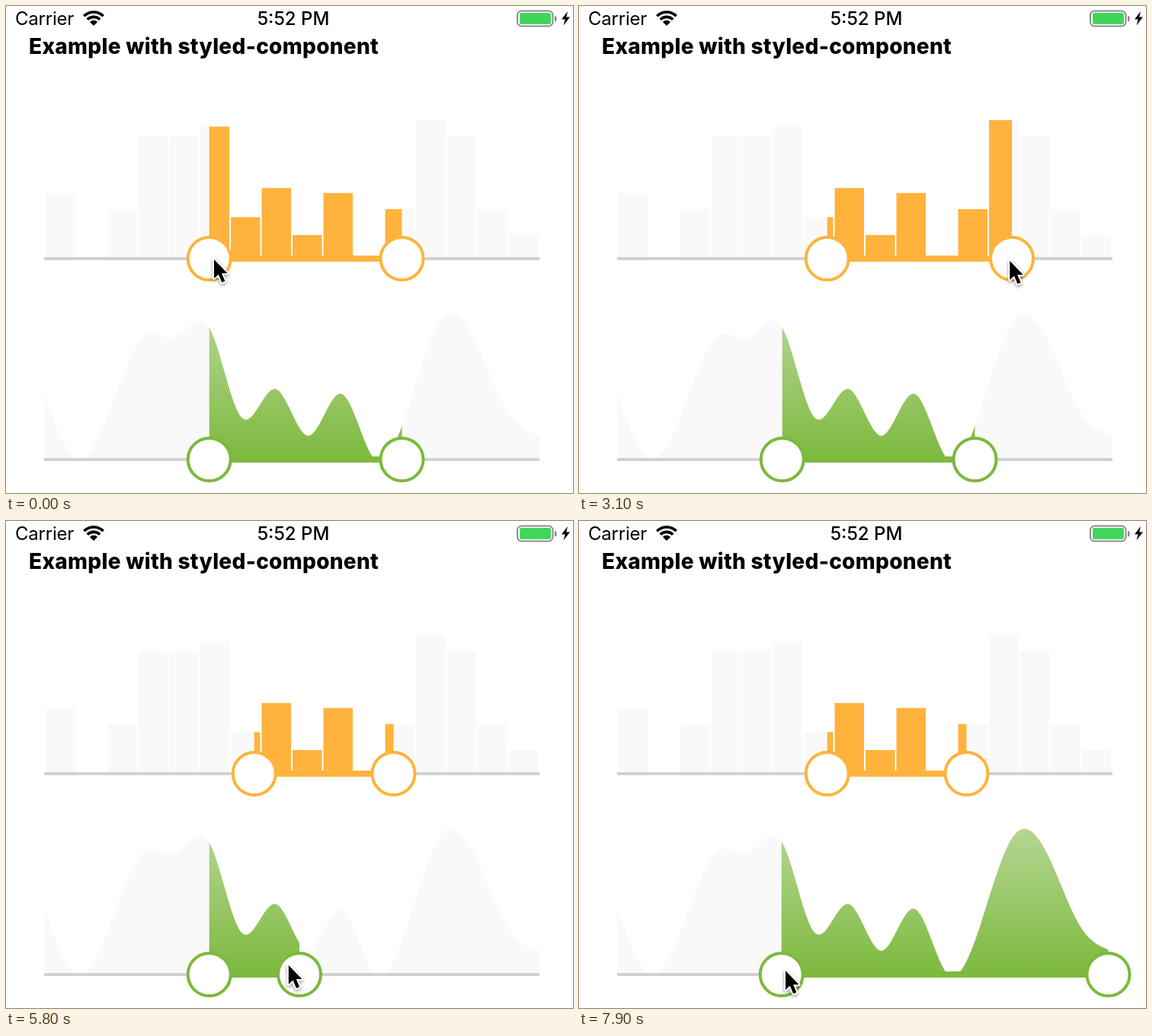
These frames come from a looping animation (744x640 px, 8 s). An HTML page with a canvas:

```html
<!DOCTYPE html>
<html lang="en">
<head>
<meta charset="utf-8">
<title>Range sliders</title>
<style>
  html, body { margin: 0; width: 100%; height: 100%; overflow: hidden; background: #fff; }
  canvas { display: block; }
</style>
</head>
<body>
<canvas id="stage" width="744" height="640"></canvas>
<script>
const ctx = document.getElementById('stage').getContext('2d');
const LOOP = 8000, STEP = 100;
const LEFT = 50, WIDTH = 650;
const BAR_BASE = 330, AREA_BASE = 594;
const SHAPE_DROP = 0.7;
const ORANGE = '#ffb33c', GREEN = '#7cb93d', PALE = '#f9f9f9', TRACK = '#d1d1d1';
const FONT = 'Inter, "Open Sans", sans-serif';

const values = [50, 10, 40, 85, 85, 91, 35, 53, 24, 50, 10, 40, 95, 85, 40, 24];
const heights = values.map(v => (v - 10) * 2.125);

const rest = { barStart: 266.7, barEnd: 519.5, areaStart: 266.7, areaEnd: 519.5, x: 272, y: 332 };

// A drag takes a thumb to a place, the pointer holding it at an offset (grip).
const drag = (start, end, thumb, to, grip, y) =>
  ({ start, end, goal: { [thumb]: to, x: to + grip, y } });
const glide = (start, end, x, y) => ({ start, end, goal: { x, y } });

const moves = [
  drag(0, 950, 'barStart', 98, -12, 336),
  drag(950, 1850, 'barStart', 325.7, 26, 334),
  glide(1950, 2400, 514, 334),
  drag(2500, 3000, 'barEnd', 594, -3, 334),
  drag(3000, 3400, 'barEnd', 428, -8, 334),
  drag(3400, 3800, 'barEnd', 508.5, -4, 345),
  glide(3900, 4250, 500, 572),
  glide(4250, 4600, 513, 596),
  drag(5000, 5400, 'areaEnd', 622, -4, 588),
  drag(5400, 5920, 'areaEnd', 348, -17, 582),
  drag(5920, 6800, 'areaEnd', 694.5, -2.5, 590),
  glide(7000, 7300, 275, 588),
  glide(7400, 7700, 270, 590),
  drag(7800, 7900, 'areaStart', 265.7, 4.3, 590),
];

function poseAt(t) {
  const pose = { ...rest };
  for (const { start, end, goal } of moves) {
    if (t <= start) break;
    const u = Math.min(1, (t - start) / (end - start));
    const eased = u * u * (3 - 2 * u);
    for (const key in goal) pose[key] += (goal[key] - pose[key]) * eased;
  }
  return pose;
}

// Slopes of a natural cubic spline, found by relaxation.
function splineSlopes(y) {
  const n = y.length - 1, m = y.map(() => 0);
  for (let pass = 0; pass < 40; pass++) {
    for (let i = 0; i <= n; i++) {
      if (i === 0) m[i] = (3 * (y[1] - y[0]) - m[1]) / 2;
      else if (i === n) m[i] = (3 * (y[n] - y[n - 1]) - m[n - 1]) / 2;
      else m[i] = (3 * (y[i + 1] - y[i - 1]) - m[i - 1] - m[i + 1]) / 4;
    }
  }
  return m;
}

function makeArea() {
  const base = AREA_BASE + SHAPE_DROP;
  const y = heights.map(h => base - h), m = splineSlopes(y);
  const dx = WIDTH / (y.length - 1);
  const path = new Path2D();
  path.moveTo(LEFT, base);
  path.lineTo(LEFT, y[0]);
  for (let i = 0; i < y.length - 1; i++) {
    const x = LEFT + i * dx;
    path.bezierCurveTo(x + dx / 3, y[i] + m[i] / 3,
      x + dx * 2 / 3, y[i + 1] - m[i + 1] / 3, x + dx, y[i + 1]);
  }
  path.lineTo(LEFT + WIDTH, base);
  path.closePath();
  return path;
}

function makeBars() {
  const pad = 0.05, step = WIDTH / (heights.length + pad);
  const path = new Path2D();
  heights.forEach((h, i) => {
    path.rect(LEFT + step * (i + pad), BAR_BASE + SHAPE_DROP - h, step * (1 - pad), h);
  });
  return path;
}

const area = makeArea(), bars = makeBars();
const shade = ctx.createLinearGradient(0, 404, 0, 598);
shade.addColorStop(0, '#b5d693');
shade.addColorStop(1, GREEN);

function rect(x, y, w, h, color, r = 0) {
  ctx.fillStyle = color;
  ctx.beginPath();
  ctx.roundRect(x, y, w, h, r);
  ctx.fill();
}

function thumb(x, y, color) {
  ctx.beginPath();
  ctx.arc(x, y, 28, 0, Math.PI * 2);
  ctx.fillStyle = '#fff';
  ctx.fill();
  ctx.lineWidth = 4;
  ctx.strokeStyle = color;
  ctx.stroke();
}

function slider(shape, base, from, to, color, fill) {
  ctx.fillStyle = PALE;
  ctx.fill(shape);
  ctx.save();
  ctx.beginPath();
  ctx.rect(from, 0, to - from, base + 4);
  ctx.clip();
  ctx.fillStyle = fill;
  ctx.fill(shape);
  ctx.restore();
  rect(LEFT, base, WIDTH, 4, TRACK);
  rect(from, base - 2, to - from, 8, color);
  thumb(from, base + 2, color);
  thumb(to, base + 2, color);
}

function text(str, x, y, font, align = 'left', spacing = '0px') {
  ctx.font = font + ' ' + FONT;
  ctx.textAlign = align;
  ctx.letterSpacing = spacing;
  ctx.fillStyle = '#000';
  ctx.fillText(str, x, y);
}

function polygon(points) {
  ctx.beginPath();
  points.forEach(([x, y]) => ctx.lineTo(x, y));
  ctx.closePath();
}

function wifi(x, y) {
  const a = -Math.PI * 0.75, b = -Math.PI * 0.25;
  ctx.strokeStyle = ctx.fillStyle = '#000';
  ctx.lineWidth = 3.7;
  for (const r of [18, 11.7]) {
    ctx.beginPath();
    ctx.arc(x, y, r, a, b);
    ctx.stroke();
  }
  ctx.beginPath();
  ctx.moveTo(x, y);
  ctx.arc(x, y, 7.2, a, b);
  ctx.fill();
}

function battery() {
  ctx.strokeStyle = '#8c8c8c';
  ctx.lineWidth = 2;
  ctx.beginPath();
  ctx.roundRect(671, 6.5, 46.5, 20, 5.5);
  ctx.stroke();
  rect(674, 9, 41, 15, '#41d65b', 2.5);
  rect(720, 13, 2.6, 7.5, '#8c8c8c', [0, 3, 3, 0]);
  polygon([[737, 7], [729, 17.5], [733.6, 17.5], [731.5, 25.5], [740, 14.5], [735.2, 14.5]]);
  ctx.fillStyle = '#000';
  ctx.fill();
}

function arrow(x, y) {
  ctx.save();
  ctx.translate(x + 1, y + 1);
  polygon([[0, 0], [0, 25], [5.8, 19.8], [10.2, 30.2], [14.4, 28.4], [10, 18.2], [17.6, 18.2]]);
  ctx.lineWidth = 4;
  ctx.lineJoin = 'round';
  ctx.strokeStyle = '#fff';
  ctx.shadowColor = 'rgba(0,0,0,.4)';
  ctx.shadowBlur = 4;
  ctx.shadowOffsetY = 2;
  ctx.stroke();
  ctx.shadowColor = 'transparent';
  ctx.fillStyle = '#000';
  ctx.fill();
  ctx.restore();
}

function draw(t) {
  const pose = poseAt(t);
  rect(0, 0, 744, 640, '#fff');
  text('Carrier', 12, 25, '400 24px', 'left', '-0.2px');
  text('5:52 PM', 377, 25, '500 24px', 'center');
  wifi(115, 26);
  battery();
  text('Example with styled-component', 30, 63, '800 28px', 'left', '0.3px');
  slider(bars, BAR_BASE, pose.barStart, pose.barEnd, ORANGE, ORANGE);
  slider(area, AREA_BASE, pose.areaStart, pose.areaEnd, GREEN, shade);
  arrow(pose.x, pose.y);
}

let origin;
function tick(now) {
  origin ??= now;
  const t = (now - origin) % LOOP;
  draw(Math.floor(t / STEP) * STEP);
  requestAnimationFrame(tick);
}
requestAnimationFrame(tick);
</script>
</body>
</html>
```
